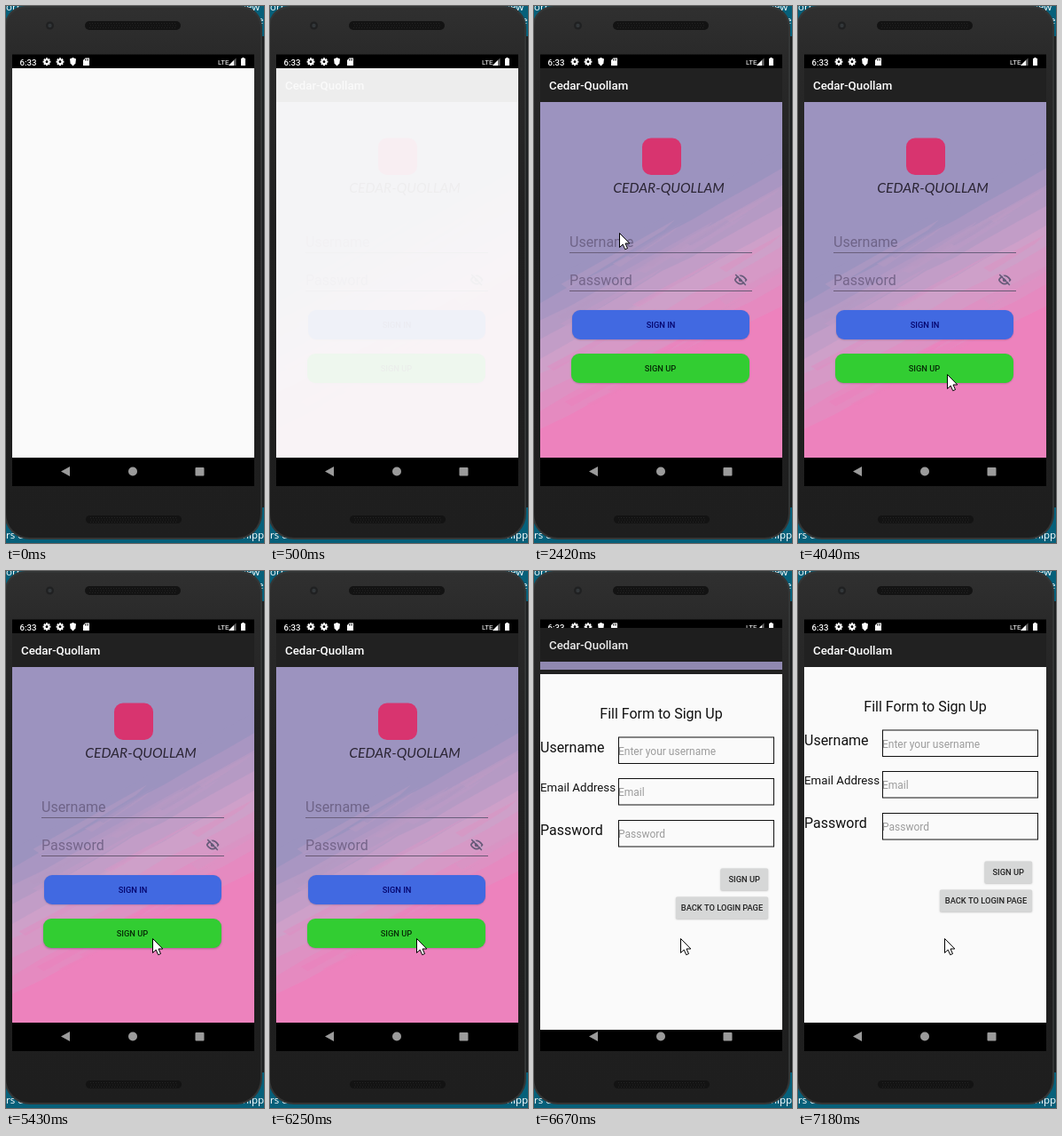
Recreate the animation shown at these times as an HTML page with a canvas. Size 291 by 604 pixels, loop 8 s.

```html
<!DOCTYPE html>
<html lang="en">
<head>
<meta charset="utf-8">
<title>Sign up flow</title>
<style>
  html, body { margin: 0; width: 100%; height: 100%; overflow: hidden; background: #1f1f1f; }
  canvas { display: block; width: 291px; height: 604px; }
</style>
</head>
<body>
<canvas id="stage" width="291" height="604"></canvas>
<script>
const ctx = document.getElementById('stage').getContext('2d');
const LOOP = 8000;
const APP = 'Cedar-Quollam';
const LEFT = 7, RIGHT = 280, WIDTH = RIGHT - LEFT;
const TOP = 70, BAR = 38, BOTTOM = 508;

// The screen refreshes in even steps; all motion is counted in them.
const step = t => Math.floor((t - 480) / 136.3);
const SHOW = 0, PRESS = 36, RELEASE = 42, OPEN = 44, OPEN_STEPS = 3;

// Pointer stops: step, x, y
const STOPS = [
  [7, 176, 514], [10, 140, 360], [11, 140, 360], [14, 96, 255],
  [16, 124, 339], [19, 153, 392], [22, 176, 414], [26, 168, 414], [29, 165, 413]
];

const clamp = v => Math.min(1, Math.max(0, v));
const mix = (a, b, k) => a + (b - a) * k;

function rect(x, y, w, h, color) {
  ctx.fillStyle = color;
  ctx.fillRect(x, y, w, h);
}

function round(x, y, w, h, r, color) {
  ctx.fillStyle = color;
  ctx.beginPath();
  ctx.roundRect(x, y, w, h, r);
  ctx.fill();
}

function disc(x, y, r, color) {
  ctx.fillStyle = color;
  ctx.beginPath();
  ctx.arc(x, y, r, 0, Math.PI * 2);
  ctx.fill();
}

function poly(points, color) {
  ctx.fillStyle = color;
  ctx.beginPath();
  points.forEach(([x, y]) => ctx.lineTo(x, y));
  ctx.closePath();
  ctx.fill();
}

function text(str, x, y, size, color, weight = 400, align = 'left', family = 'Roboto') {
  ctx.font = `${weight} ${size}px ${family}, sans-serif`;
  ctx.textAlign = align;
  ctx.fillStyle = color;
  ctx.fillText(str, x, y);
}

function withShadow(color, blur, dy, paint) {
  ctx.save();
  ctx.shadowColor = color;
  ctx.shadowBlur = blur;
  ctx.shadowOffsetY = dy;
  paint();
  ctx.restore();
}

function grille(x, y, w, h) {
  round(x, y, w, h, h / 2, '#131313');
  for (let r = 0; r < 3; r++)
    for (let i = x + 5 + r % 2; i < x + w - 4; i += 3)
      rect(i, y + 2 + r * 2.5, 1, 1, '#242424');
}

function device() {
  rect(0, 0, 291, 604, '#06607a');
  rect(286, 34, 5, 530, '#1c1f20');
  const label = (s, x, y) => text(s, x, y, 11.5, '#fff', 400, 'left', '"Open Sans"');
  label('orr', 0, 5);
  label('iew', 268, 5);
  label('e', 284, 20);
  label('rs d', 0, 599);
  label('hipp', 267, 599);
  round(-2, 0, 291, 600, [24, 24, 29, 29], '#343636');
  const g = ctx.createLinearGradient(0, 0, 0, 600);
  g.addColorStop(0, '#303030');
  g.addColorStop(0.1, '#292929');
  g.addColorStop(0.4, '#202020');
  g.addColorStop(1, '#1e1e1e');
  round(0, 2, 287, 596, [22, 22, 27, 27], g);
  disc(49.5, 22, 4.5, '#202122');
  disc(49.5, 22, 2.2, '#33373a');
  grille(89, 17, 108, 10);
  grille(90, 573, 108, 9);
}

function gear(x, y) {
  for (let i = 0; i < 8; i++) {
    ctx.save();
    ctx.translate(x, y);
    ctx.rotate(i * Math.PI / 4);
    rect(-1, -4.4, 2, 2.4, '#fff');
    ctx.restore();
  }
  disc(x, y, 3.3, '#fff');
  disc(x, y, 1.4, '#000');
}

function systemBars() {
  rect(LEFT, 54.5, WIDTH, 485.5, '#000');
  text('6:33', 15.5, 66.5, 9.6, '#fff', 500);
  gear(46, 62.7);
  gear(61, 62.7);
  poly([[75.5, 58], [79, 59.5], [78.4, 64.5], [75.5, 67.5], [72.6, 64.5], [72, 59.5]], '#fff');
  poly([[89.5, 58.5], [94, 58.5], [94, 67], [87, 67], [87, 61]], '#fff');
  for (let i = 0; i < 3; i++) rect(89 + i * 1.6, 59.6, 0.8, 1.8, '#000');
  text('LTE', 239, 66, 8, '#fff');
  poly([[251, 67], [259.5, 58.5], [259.5, 67]], '#666');
  poly([[251, 67], [257, 61], [257, 67]], '#fff');
  rect(265, 59, 5, 8, '#fff');
  rect(266.3, 58, 2.4, 1, '#fff');
  poly([[62, 523.5], [72, 518], [72, 529]], '#9b9b9b');
  disc(143, 523.5, 5, '#9b9b9b');
  round(213.5, 519, 10, 9.5, 1, '#9b9b9b');
}

function seeded(seed) {
  return () => (seed = seed * 16807 % 2147483647) / 2147483647;
}

const PURPLE = [156, 147, 191], MAUVE = [206, 160, 201], PINK = [237, 130, 189];

function washColor(k, alpha = 1) {
  const [a, b, f] = k < 0.5 ? [PURPLE, MAUVE, k * 2] : [MAUVE, PINK, k * 2 - 1];
  return `rgba(${a.map((v, i) => Math.round(mix(v, b[i], f)))},${alpha})`;
}

// Height of the diagonal brush edge for shade k at fraction u across
const edgeY = (k, u) => mix(315 + 160 * k, 160 + 176 * k, u);

function wash() {
  const rnd = seeded(71);
  ctx.save();
  ctx.beginPath();
  ctx.rect(LEFT, TOP + BAR, WIDTH, BOTTOM - TOP - BAR);
  ctx.clip();
  rect(LEFT, TOP, WIDTH, BOTTOM - TOP, washColor(0));
  for (let n = 0; n <= 8; n++) {
    const edge = [];
    for (let u = 0; u <= 1; u += 0.125)
      edge.push([LEFT + u * WIDTH, edgeY(n / 8, u) + rnd() * 5 - 2.5]);
    poly([...edge, [RIGHT, BOTTOM], [LEFT, BOTTOM]], washColor(n / 8));
  }
  for (let n = 0; n < 24; n++) {
    const k = rnd(), u = rnd() * 0.8, v = u + 0.2 + rnd() * 0.3, h = 2 + rnd() * 5;
    const x = LEFT + u * WIDTH, x2 = LEFT + v * WIDTH;
    poly([[x, edgeY(k, u)], [x2, edgeY(k, v)], [x2 - 12, edgeY(k, v) + h + 6],
      [x + 8, edgeY(k, u) + h]], washColor(clamp(k + rnd() * 0.3 - 0.12), 0.6));
  }
  ctx.restore();
}

function appBar() {
  rect(LEFT, TOP, WIDTH, BAR, '#212121');
  text(APP, 17, 94, 13.3, '#fff', 500);
}

function hiddenEye(x, y) {
  const ink = '#665a79';
  ctx.strokeStyle = ink;
  ctx.lineWidth = 1.7;
  ctx.beginPath();
  ctx.moveTo(x - 6.5, y);
  ctx.quadraticCurveTo(x, y - 9.4, x + 6.5, y);
  ctx.quadraticCurveTo(x, y + 9.4, x - 6.5, y);
  ctx.stroke();
  disc(x, y, 2.3, ink);
  for (const [d, color] of [[1.3, '#c9a0c8'], [0, ink]]) {
    ctx.strokeStyle = color;
    ctx.lineWidth = 1.5;
    ctx.beginPath();
    ctx.moveTo(x - 5.8 + d, y - 6 - d);
    ctx.lineTo(x + 5.8 + d, y + 6 - d);
    ctx.stroke();
  }
}

function pill(label, x, y, w, color, ink, raise) {
  withShadow(`rgba(40,20,60,${0.25 + 0.2 * raise})`, 2 + raise, 0.7 + raise,
    () => round(x, y, w, 33, 9, color));
  text(label, x + w / 2, y + 20, 9.3, ink, 500, 'center');
}

function login(raise) {
  wash();
  appBar();
  round(122, 148.5, 44, 41.5, 10, '#d8346f');
  text(APP.toUpperCase(), 152, 210, 15.6, '#2b2534', 'italic 400', 'center', 'Lato');
  text('Username', 40, 271, 16, '#6f6488');
  rect(40, 277, 206, 1, '#6a5f7c');
  text('Password', 40, 313.5, 16, '#75658a');
  rect(40, 320, 206, 1, '#6a5a74');
  hiddenEye(233, 308);
  pill('SIGN IN', 43, 342, 200, '#4169e1', '#05056e', 0);
  pill('SIGN UP', 42, 391, 201, '#32cd32', '#062b06', raise);
}

function field(label, size, hint, y, base) {
  text(label, LEFT, base, size, '#111');
  ctx.strokeStyle = '#111';
  ctx.lineWidth = 1;
  ctx.strokeRect(95.5, y, 175, 29.5);
  text(hint, 95, y + 19.5, 12, '#9c9c9c');
}

function grayButton(label, x, y, w) {
  withShadow('rgba(0,0,0,0.25)', 2, 0.7, () => round(x, y, w, 24.5, 1.5, '#d6d7d7'));
  text(label, x + w / 2, y + 15.5, 9.3, '#212121', 500, 'center');
}

function form() {
  rect(LEFT, TOP, WIDTH, BOTTOM - TOP, '#fafafa');
  appBar();
  text('Fill Form to Sign Up', 143.5, 158, 16, '#111', 400, 'center');
  field('Username', 16, 'Enter your username', 179, 196);
  field('Email Address', 13.3, 'Email', 225.5, 240);
  field('Password', 16, 'Password', 272.5, 288.5);
  grayButton('SIGN UP', 210.5, 326.5, 53.5);
  grayButton('BACK TO LOGIN PAGE', 160, 358.5, 104);
}

function pointer(n) {
  const next = STOPS.findIndex(s => s[0] > n);
  if (next === 0) return;
  const b = STOPS.at(next), a = next < 0 ? b : STOPS[next - 1];
  const k = a === b ? 1 : 1 - (1 - (n - a[0]) / (b[0] - a[0])) ** 1.6;
  ctx.save();
  ctx.translate(Math.round(mix(a[1], b[1], k)) + 0.5, Math.round(mix(a[2], b[2], k)) + 0.5);
  poly([[0, 0], [0, 16], [3.7, 12.6], [6.2, 18.2], [9, 17], [6.5, 11.5], [11.3, 11.5]], '#fff');
  ctx.strokeStyle = '#000';
  ctx.lineWidth = 1;
  ctx.stroke();
  ctx.restore();
}

function shifted(dy, edge, paint) {
  ctx.save();
  ctx.beginPath();
  ctx.rect(LEFT, edge, WIDTH, 540 - edge);
  ctx.clip();
  ctx.translate(0, Math.round(dy));
  paint();
  ctx.restore();
}

function veil(color) {
  rect(LEFT, TOP, WIDTH, BOTTOM - TOP, color);
}

// The form rises from below while the login page drifts up behind it.
function openForm(n) {
  const rest = 1 - clamp((n - OPEN) / OPEN_STEPS);
  if (rest > 0) {
    shifted(-7 + 6 * rest ** 4, 55, () => {
      login(0);
      veil('rgba(0,0,0,0.08)');
    });
  }
  shifted(17 * rest ** 2, Math.round(TOP + 207 * rest ** 4), form);
}

function draw(t) {
  const n = step(t);
  device();
  systemBars();
  if (n < SHOW) {
    veil('#fafafa');
  } else if (n < OPEN) {
    const pressed = n >= PRESS && n < RELEASE;
    login(pressed ? clamp((n - PRESS + 1) / 3) : 0);
    if (n === SHOW) veil('rgba(250,250,250,0.94)');
  } else {
    openForm(n);
  }
  pointer(n);
}

const start = performance.now();
function tick() {
  draw((performance.now() - start) % LOOP);
  requestAnimationFrame(tick);
}
tick();
</script>
</body>
</html>
```
